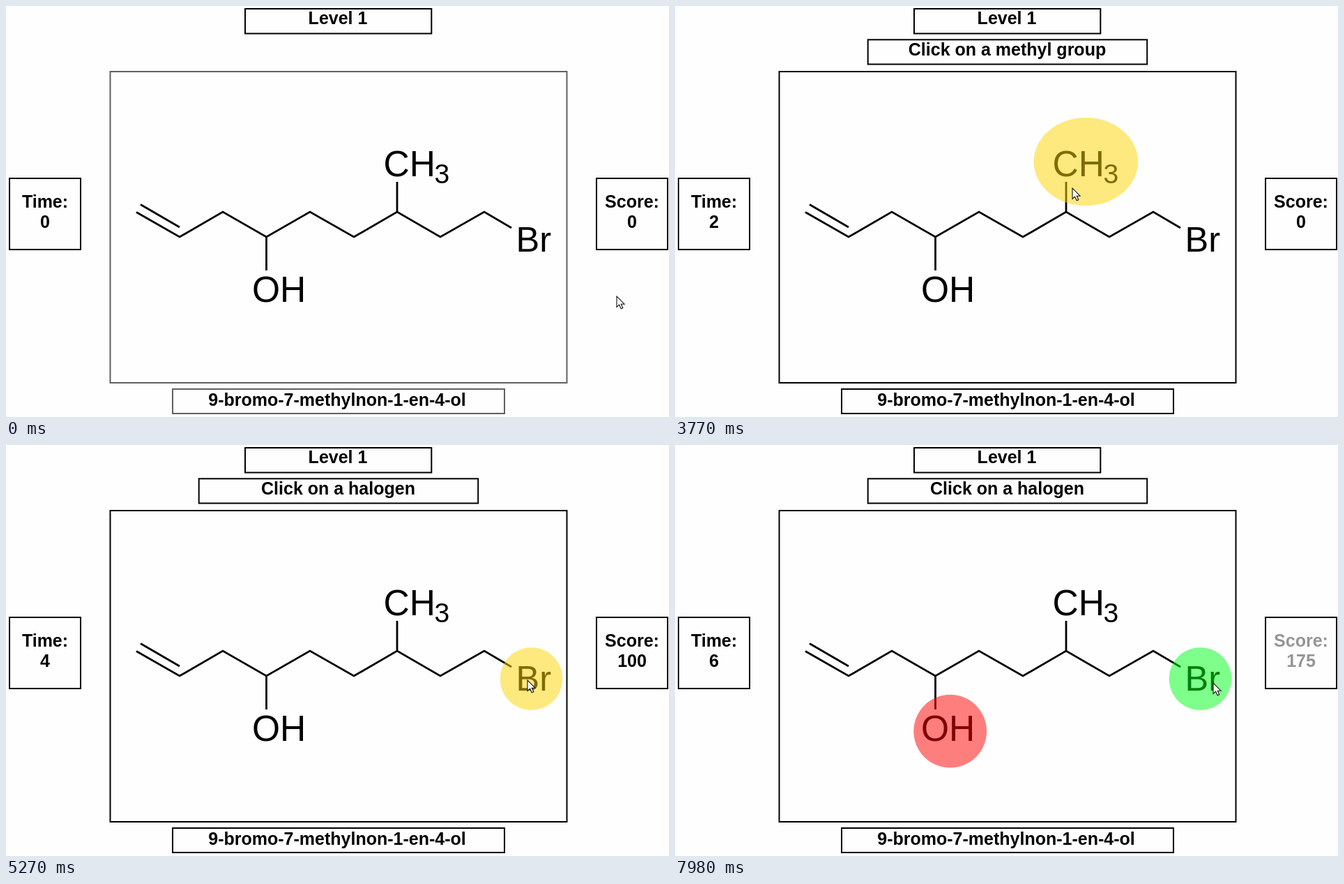
An HTML page for the animation above (8 s loop, 951 by 589 pixels).

```html
<!DOCTYPE html>
<html lang="en">
<head>
<meta charset="utf-8">
<title>Functional group quiz</title>
<style>
  html, body { margin: 0; width: 100%; height: 100%; overflow: hidden; background: #fefefe; }
  svg { display: block; width: 951px; height: 589px; }
  text { font-family: "Liberation Sans", Arial, sans-serif; }
  .label { font-size: 25px; font-weight: bold; text-anchor: middle; }
  .atom { font-size: 51.5px; }
  .box { fill: none; stroke: #000; stroke-width: 2; }
  .bond { fill: none; stroke: #000; stroke-width: 2.8; }
  .spot { fill-opacity: .5; }
</style>
</head>
<body>
<svg viewBox="0 0 951 589">
  <rect class="box" x="343" y="4" width="267.3" height="35.5"/>
  <rect class="box" x="5" y="247" width="102" height="102"/>
  <rect class="box" x="847" y="247" width="102" height="102"/>
  <rect class="box board" x="149.5" y="94" width="655" height="446"/>
  <rect class="box board" x="239" y="549" width="476" height="35"/>
  <rect class="box" id="promptBox" x="276.7" y="48.3" width="400.5" height="35.2"/>

  <text class="label" x="476" y="26">Level 1</text>
  <text class="label" id="prompt" x="476.5" y="71"></text>
  <text class="label" x="475" y="573">9-bromo-7-methylnon-1-en-4-ol</text>
  <text class="label" x="56" y="289">Time:</text>
  <text class="label" id="time" x="56" y="318"></text>
  <g id="scoreGroup">
    <text class="label" x="898" y="289">Score:</text>
    <text class="label" id="score" x="898" y="318"></text>
  </g>

  <path class="bond" d="M187 295.5L249 331L311 295L373.5 331L436 295L499 331L561 295L623 331L686 295L725 318M193 284.5L249 317M373.5 331V379M561 295V252"/>
  <text class="atom" x="353" y="424">OH</text>
  <text class="atom" x="541.5" y="244">CH<tspan font-size="39" x="614.5" y="253.5">3</tspan></text>
  <text class="atom" x="731.5" y="352" style="font-size:50.5px">Br</text>

  <ellipse class="spot" id="alkene" cx="223.3" cy="312.7" rx="52.4" ry="52.4"/>
  <ellipse class="spot" id="alcohol" cx="394.7" cy="410.2" rx="52.4" ry="52.4"/>
  <ellipse class="spot" id="methyl" cx="589.3" cy="223.1" rx="74.8" ry="63.2"/>
  <ellipse class="spot" id="bromo" cx="753.5" cy="335" rx="44.8" ry="44.8"/>

  <path id="cursor" fill="#fff" stroke="#111" stroke-width="1.1" d="M0 0V15.5L3.6 12.2L6.2 17.8L8.8 16.7L6.3 11.2H11Z"/>
</svg>
<script>
const LOOP = 8000;
const HOVER = "#ffd600", RIGHT = "#00ff18", WRONG = "#f00", OFF = "none";
const $ = id => document.getElementById(id);
const clamp = v => Math.min(1, Math.max(0, v));
const fade = (t, start, length) => clamp((t - start) / length);

// Each track lists [start time, value]; the value holds until the next entry.
const spots = {
  alkene: [[0, OFF], [1680, HOVER], [2130, OFF], [7040, HOVER], [7410, OFF]],
  alcohol: [[0, OFF], [1380, HOVER], [1560, OFF], [5940, HOVER], [6270, OFF], [6620, WRONG]],
  methyl: [[0, OFF], [2220, HOVER], [4040, RIGHT], [4630, OFF]],
  bromo: [[0, OFF], [5200, HOVER], [5730, OFF], [7500, HOVER], [7790, RIGHT]]
};
const seconds = [[0, 0], [1840, 1], [2840, 2], [3840, 3], [5240, 4], [6270, 5], [7070, 6]];
const scores = [[0, 0], [4060, 100], [7790, 175]];
const prompts = [[0, "Click on a methyl group"], [4630, "Click on a halogen"]];

// Pointer rests and stops: [time, x, y]
const pointer = [
  [30, 876, 416], [690, 660, 402], [870, 660, 402], [1260, 420, 387], [1650, 221, 318],
  [1860, 198, 312], [2100, 198, 312], [2250, 570, 261], [3770, 570, 261], [4000, 597, 245],
  [4800, 597, 245], [5250, 748, 337], [5700, 748, 337], [5970, 406, 414], [6270, 406, 414],
  [6440, 416, 420], [6640, 416, 420], [7070, 211, 277], [7190, 211, 277], [7230, 216, 281],
  [7370, 216, 281], [7530, 765, 338], [7790, 765, 338], [7950, 772, 341]
];

const held = (track, t) => track.filter(([start]) => start <= t).pop();

function pointerAt(t) {
  const next = pointer.findIndex(p => p[0] > t);
  if (next === 0) return pointer[0].slice(1);
  if (next < 0) return pointer[pointer.length - 1].slice(1);
  const [t0, x0, y0] = pointer[next - 1], [t1, x1, y1] = pointer[next];
  const k = (t - t0) / (t1 - t0), e = k * k * (3 - 2 * k);
  return [x0 + (x1 - x0) * e, y0 + (y1 - y0) * e];
}

function draw(t) {
  const boardAlpha = 0.62 + 0.38 * fade(t, 0, 330);
  document.querySelectorAll(".board").forEach(el => el.style.opacity = boardAlpha);

  const promptAlpha = fade(t, 870, 780);
  const [promptStart, promptText] = held(prompts, t);
  $("promptBox").style.opacity = promptAlpha;
  $("prompt").textContent = promptText;
  $("prompt").style.opacity = promptStart ? fade(t, promptStart, 600) : clamp(promptAlpha * 1.6);

  const [scoreStart, points] = held(scores, t);
  $("score").textContent = points;
  $("scoreGroup").style.opacity = scoreStart ? fade(t, scoreStart, 470) : 1;
  $("time").textContent = held(seconds, t)[1];

  for (const id in spots) $(id).setAttribute("fill", held(spots[id], t)[1]);
  $("cursor").setAttribute("transform", `translate(${pointerAt(t)})`);
}

const begin = performance.now();
function tick() {
  draw((performance.now() - begin) % LOOP);
  requestAnimationFrame(tick);
}
tick();
</script>
</body>
</html>
```
